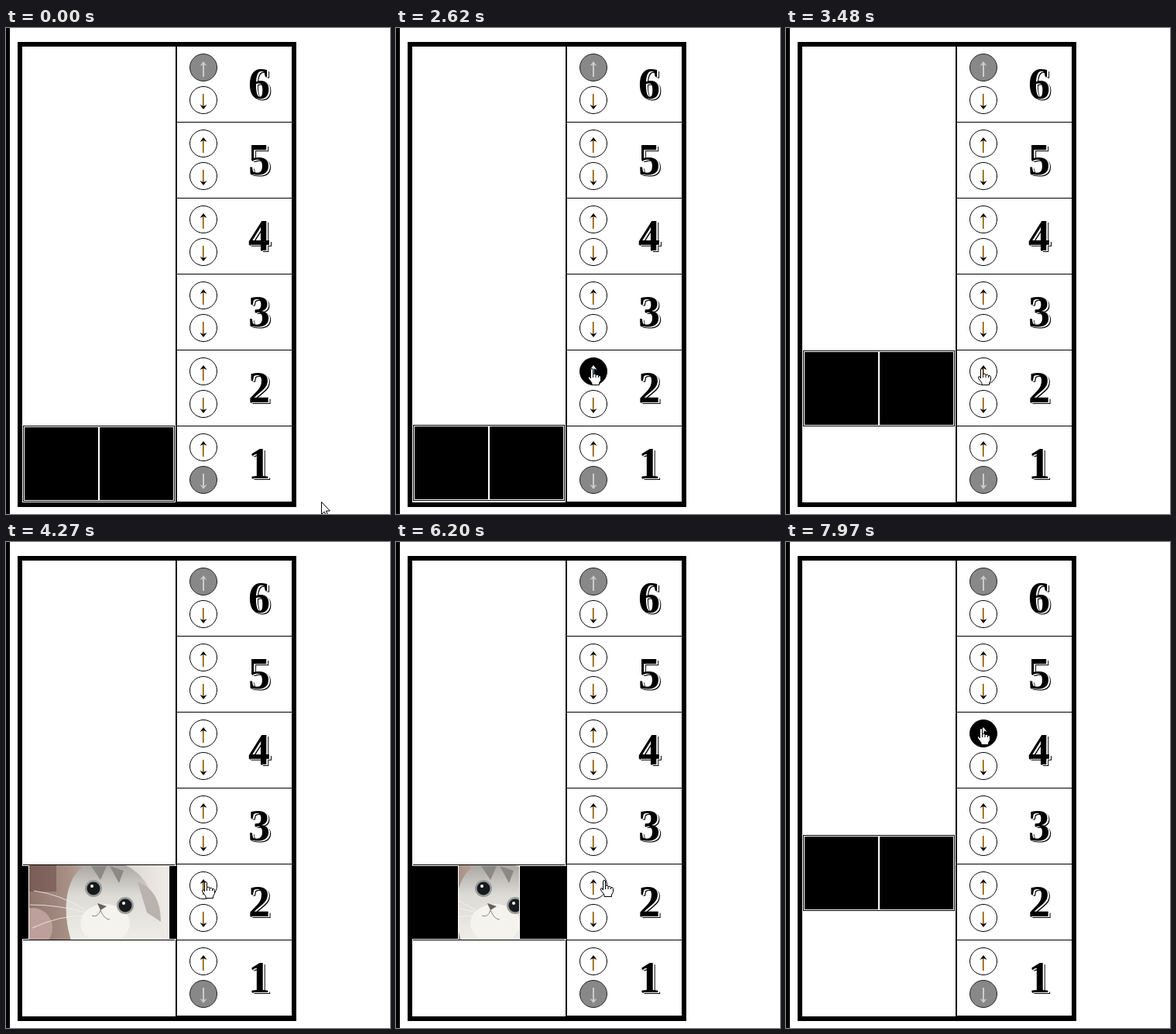
An HTML page that plays this animation: 496x627 px, repeating every 8 s.

```html
<!DOCTYPE html>
<html lang="en">
<head>
<meta charset="utf-8">
<title>Lift</title>
<style>
  html, body { margin: 0; width: 100%; height: 100%; overflow: hidden; background: #fff; }
  svg { display: block; }
  rect { shape-rendering: crispEdges; }
  .number {
    font: bold 56px "Liberation Serif", "Noto Serif", serif;
    text-anchor: middle;
    filter: drop-shadow(2px 1px 0 #fff) drop-shadow(1px 1px 0 #000);
  }
  .button circle { fill: #fff; stroke: #000; }
  .button .core { fill: #7a4a00; }
  .button .edge { fill: #d8a850; }
  .off circle { fill: #888; stroke: #222; }
  .off path, .off rect.core, .off rect.edge { fill: #ccc; }
  .pressed circle { fill: #000; }
  .pressed path, .pressed rect.core { fill: #fff; }
  .pressed rect.edge { fill: #6aa0d8; }
  .door rect + rect { fill: #000; }
  .cursor { fill: #fff; stroke: #000; stroke-linejoin: round; }
</style>
</head>
<body>
<svg width="496" height="627" viewBox="0 0 496 627">
  <defs>
    <clipPath id="shaft"><rect x="21" y="24" width="199" height="588"/></clipPath>
    <clipPath id="room"><rect x="1" y="1" width="194" height="96"/></clipPath>
    <linearGradient id="wall">
      <stop offset="0" stop-color="#8d7169"/>
      <stop offset=".3" stop-color="#a89086"/>
      <stop offset=".62" stop-color="#d9d2cb"/>
      <stop offset="1" stop-color="#f1eeea"/>
    </linearGradient>
    <linearGradient id="fur" x2="0" y2="1">
      <stop offset="0" stop-color="#aaa7a3"/>
      <stop offset=".4" stop-color="#dddbd6"/>
      <stop offset="1" stop-color="#efede7"/>
    </linearGradient>
  </defs>

  <rect width="5" height="627"/>
  <rect x="15" y="18" width="360" height="600"/>
  <rect x="21" y="24" width="348" height="588" fill="#fff"/>
  <rect x="219" y="24" width="2" height="588"/>
  <g id="floors"></g>

  <g clip-path="url(#shaft)">
    <g id="car">
      <rect width="196" height="98"/>
      <rect x="1" y="1" width="194" height="96" fill="#fff"/>
      <g id="photo" clip-path="url(#room)">
        <rect x="1" y="1" width="194" height="96" fill="url(#wall)"/>
        <rect x="1" y="1" width="42" height="34" fill="#6b4c45" opacity=".55"/>
        <ellipse cx="12" cy="82" rx="26" ry="26" fill="#bda09c"/>
        <path d="M62 98C50 60 54 14 82 1H132C158 12 176 44 179 98Z" fill="url(#fur)"/>
        <path d="M148 22Q178 34 178 74L160 62Z" fill="#b9b2ad"/>
        <path d="M88 2L100 20L108 2ZM112 2L124 24L130 8Z" fill="#8c8985"/>
        <ellipse cx="106" cy="76" rx="32" ry="25" fill="#f5f3ee"/>
        <g fill="#9a9b99"><circle cx="91" cy="31" r="11"/><circle cx="132" cy="53" r="11"/></g>
        <g fill="#171a1d"><circle cx="91" cy="31" r="8.5"/><circle cx="132" cy="53" r="8.5"/></g>
        <g fill="#fff"><circle cx="89" cy="28" r="2"/><circle cx="130" cy="50" r="2"/></g>
        <path d="M96 50L108 54L100 59Z" fill="#67605c"/>
        <path d="M100 59Q97 69 89 66M100 59Q105 71 112 71" fill="none" stroke="#8a8580"/>
        <path d="M82 62Q45 52 9 52M82 66Q45 66 12 82M80 58Q46 38 14 34" fill="none" stroke="#f6f3ef" stroke-width=".8"/>
      </g>
      <g class="door" id="left"><rect x="1" y="1" width="97" height="96" fill="#fff"/><rect x="2" y="2" width="95" height="94"/></g>
      <g class="door" id="right"><rect x="98" y="1" width="97" height="96" fill="#fff"/><rect x="99" y="2" width="95" height="94"/></g>
    </g>
  </g>

  <g id="pointer">
    <path class="cursor" id="arrow" d="M.5 .5V16.5L4.2 13L6.7 18.5L9 17.5L6.5 12H11.5Z"/>
    <path class="cursor" id="hand" d="M-1.5 13V2Q-1.5 .5 0 .5T1.5 2V7.5Q4.5 6 5 8.5Q8 7.5 8.5 9.5Q11.5 9 11.5 11.5V15.5L9.5 19V21.5H0V19L-4.5 13Q-5 10.5-3 10.5ZM1.5 7.5V12M5 8.5V12M8.5 9.5V12"/>
    <path id="beam" fill="none" stroke="#000" d="M-3-7.5H-1L0-6.5L1-7.5H3M0-6.5V6.5M-3 7.5H-1L0 6.5L1 7.5H3"/>
  </g>
</svg>

<script>
const LOOP = 8000, FLOOR = 98, BUTTON_X = 255;
const get = id => document.getElementById(id);
const clamp = v => Math.min(1, Math.max(0, v));
const swing = (t, start, length) => (1 - Math.cos(Math.PI * clamp((t - start) / length))) / 2;

// Floors are drawn from the top down.
function button(name, y, up, off) {
  return `<g id="${name}" class="button${off ? ' off' : ''}" transform="translate(${BUTTON_X} ${y})">
    <circle r="17.5"/>
    <g transform="${up ? '' : 'translate(0 4) scale(1 -1)'}">
      <rect class="core" x="-1" y="-6" width="1" height="18"/>
      <rect class="edge" x="0" y="-6" width="1" height="18"/>
      <path d="M0-8L4.5-2L0-4L-4.5-2Z"/>
    </g></g>`;
}
let markup = '';
for (let n = 6, y = 24; n > 0; n--, y += FLOOR) {
  markup += `<rect x="221" y="${y + 97}" width="148" height="1"/>`
    + button('up' + n, y + 27, true, n === 6)
    + button('down' + n, y + 69, false, n === 1)
    + `<text class="number" x="327" y="${y + 67}">${n}</text>`;
}
get('floors').innerHTML = markup;

// Redraw moments: first, last, count.
const bursts = [
  [0, 70, 2], [1780, 2220, 7], [2550, 3020, 7], [3110, 3330, 4], [3410, 3780, 6],
  [4180, 4270, 2], [5810, 6200, 6], [6290, 6610, 5], [6670, 6970, 5],
  [7290, 7290, 1], [7440, 7970, 7]
];
const ticks = bursts.flatMap(([a, b, n]) =>
  Array.from({ length: n }, (_, i) => n > 1 ? a + (b - a) * i / (n - 1) : a));
const snap = t => ticks.filter(k => k <= t + 0.01).pop();

// Pointer hot spot: time, x, y.
const path = [
  [0, 407, 611], [70, 372, 585], [1780, 338, 565], [2220, 253, 439], [4100, 253, 439],
  [4270, 258, 438], [5740, 258, 438], [6200, 269, 436], [6400, 274, 408],
  [6610, 268, 370], [6820, 246, 300], [6970, 252, 240], [LOOP, 252, 240]
];
function pointerAt(t) {
  const i = Math.max(1, path.findIndex(p => p[0] >= t));
  const [a, x, y] = path[i - 1], [b, u, v] = path[i];
  const k = clamp((t - a) / (b - a));
  return [Math.round(x + (u - x) * k), Math.round(y + (v - y) * k)];
}
function shapeAt(x, y) {
  const row = (y - 24) % FLOOR;
  if ([27, 69].some(c => Math.hypot(x - BUTTON_X, row - c) <= 18)) return 'hand';
  return x > 313 && x < 344 && row > 20 && row < 78 ? 'beam' : 'arrow';
}

const place = (id, x, y) => get(id).setAttribute('transform', `translate(${x} ${y})`);

function draw(time) {
  const t = snap(time);
  const carY = 513 - 97 * swing(t, 2491, 963) - 196 * swing(t, 7185, 2700);
  const gap = Math.round(90 * (swing(t, 3430, 350) - swing(t, 5766, 800)));
  place('car', 22, Math.round(carY));
  place('left', -gap, 0);
  place('right', gap, 0);
  get('photo').style.display = gap ? '' : 'none';

  get('up2').classList.toggle('pressed', t >= 2550 && t < 3410);
  get('up4').classList.toggle('pressed', t >= 7290);

  const [x, y] = pointerAt(t);
  const shape = shapeAt(x, y);
  place('pointer', x, y);
  for (const id of ['arrow', 'hand', 'beam']) get(id).style.display = id === shape ? '' : 'none';
}

function loop() {
  draw(performance.now() % LOOP);
  requestAnimationFrame(loop);
}
loop();
</script>
</body>
</html>
```
